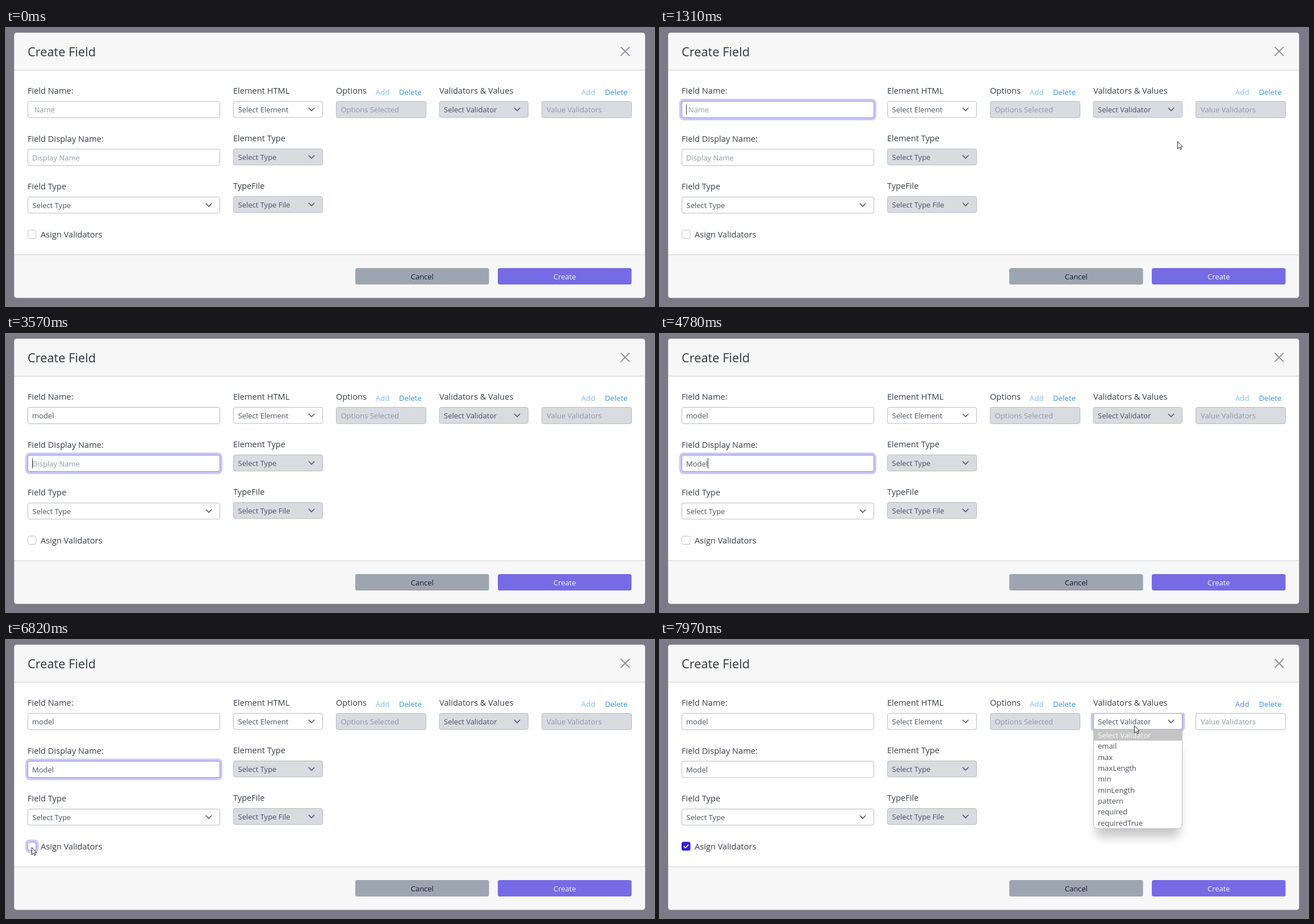
An HTML page that plays this animation: 1141 by 491 pixels, repeating every 8 s.

```html
<!DOCTYPE html>
<html lang="en">
<head>
<meta charset="utf-8">
<title>Create Field</title>
<style>
  html, body { margin: 0; width: 100%; height: 100%; overflow: hidden; background: #7b7a86; }
  svg { display: block; width: 100%; height: 100%; }
  text { font: 13px "Open Sans", "Noto Sans", sans-serif; fill: #4a5260; white-space: pre; }
  .title { font-size: 21.8px; fill: #2f3540; }
  .label { font-size: 14.6px; fill: #363d49; }
  .hint { fill: #8f97a4; }
  .link { font-size: 13.2px; fill: #3091f2; }
  .box { fill: #fff; stroke: #b5bbc5; }
  .off { fill: #d8dbe0; }
  .ring { fill: none; stroke: #321fdb; stroke-opacity: .25; stroke-width: 4; }
  .edge { fill: none; stroke: #998fed; }
  .mid { text-anchor: middle; }
</style>
</head>
<body>
<svg id="stage" viewBox="0 0 1141 491" xmlns="http://www.w3.org/2000/svg">
  <defs>
    <filter id="blur" x="-30%" y="-30%" width="160%" height="160%"><feGaussianBlur stdDeviation="9"/></filter>
    <clipPath id="below"><rect x="740" y="129" width="200" height="60"/></clipPath>
  </defs>
  <rect width="1141" height="491" fill="#7b7a86"/>
  <rect x="14" y="8" width="1111.5" height="469" rx="5" fill="#fff"/>
  <path d="M14 74.5V13a5 5 0 0 1 5-5H1120.5a5 5 0 0 1 5 5V74.5ZM14 400.5V472a5 5 0 0 0 5 5H1120.5a5 5 0 0 0 5-5V400.5Z" fill="#f7f7f7"/>
  <path d="M14 74.5H1125.5M14 400.5H1125.5" stroke="#d0d1d4"/>
  <rect x="14" y="8" width="1111.5" height="469" rx="5" fill="none" stroke="#6d6c77" stroke-opacity=".5"/>
  <path d="M1083 34 1097.5 48.5M1097.5 34 1083 48.5" stroke="#8a909a" stroke-width="1.8" stroke-linecap="round"/>
  <g id="form"></g>
  <g id="live"></g>
</svg>
<script>
const LOOP = 8000, BLINK = 530, STEP = 70;
const form = document.getElementById('form');
const live = document.getElementById('live');

function add(parent, tag, attrs, content) {
  const el = document.createElementNS('http://www.w3.org/2000/svg', tag);
  for (const key in attrs) el.setAttribute(key, attrs[key]);
  if (content) el.textContent = content;
  parent.appendChild(el);
  return el;
}
const text = (x, y, s, cls = '', parent = form) => add(parent, 'text', { x, y, class: cls }, s);
const box = (x, y, w, h, cls = 'box') => add(form, 'rect', { x, y, width: w, height: h, rx: 3.5, class: cls });
const show = (el, on) => el.setAttribute('visibility', on ? 'visible' : 'hidden');
const fade = (t, start) => Math.min(1, Math.max(0, (t - start) / 150));

function select(x, y, w, label, off) {
  const rect = box(x, y, w, 28.5, off ? 'box off' : 'box');
  text(x + 8, y + 19.5, label);
  const cx = x + w - 19.5, cy = y + 11.8;
  add(form, 'path', { d: `M${cx - 4.8} ${cy}l4.8 4.8 4.8-4.8`, fill: 'none', stroke: '#545b67',
    'stroke-width': 1.6, 'stroke-linecap': 'round', 'stroke-linejoin': 'round' });
  return rect;
}

// Focus outline: soft ring plus a tinted border
function focusMark(x, y, w, h, rx = 3.5) {
  const g = add(form, 'g', { opacity: 0 });
  add(g, 'rect', { x: x - 2.5, y: y - 2.5, width: w + 5, height: h + 5, rx: rx + 2.5, class: 'ring' });
  add(g, 'rect', { x, y, width: w, height: h, rx, class: 'edge' });
  return g;
}

function input(y, hintX, hint) {
  box(38.5, y, 338, 29);
  const mark = focusMark(38.5, y, 338, 29);
  return {
    mark,
    hint: text(hintX, y + 19.5, hint, 'hint'),
    value: text(46, y + 19.5, ''),
    caret: add(form, 'rect', { x: 46, y: y + 5.5, width: 1, height: 18, fill: '#2f3540' })
  };
}

text(38, 50, 'Create Field', 'title');
[[38, 116, 'Field Name:'], [38, 201, 'Field Display Name:'], [38, 285, 'Field Type'],
 [400, 116, 'Element HTML'], [400, 200, 'Element Type'], [400, 284, 'TypeFile'],
 [581, 116, 'Options'], [763, 116, 'Validators & Values'], [61, 370, 'Asign Validators']
].forEach(([x, y, s]) => text(x, y, s, 'label'));

text(651, 118, 'Add', 'link').style.fill = '#80baf7';
text(692, 118, 'Delete', 'link');
const addLink = text(1013, 118, 'Add', 'link');
text(1054.5, 118, 'Delete', 'link');

const name = input(129.5, 49.7, 'Name');
const display = input(214, 46, 'Display Name');
select(38.5, 298.5, 338, 'Select Type');
select(400.5, 129.5, 157, 'Select Element');
select(400.5, 213.5, 157, 'Select Type', true);
select(400.5, 297.5, 157, 'Select Type File', true);
box(581.5, 129.5, 158, 29, 'box off');
text(589.5, 149, 'Options Selected', 'hint');
const validator = select(763, 129.5, 156.5, 'Select Validator', true);
const valueBox = box(943.5, 129.5, 158, 29, 'box off');
text(952, 149, 'Value Validators', 'hint');

add(form, 'rect', { x: 615, y: 424, width: 235.5, height: 29, rx: 3.5, fill: '#9da5b1' });
add(form, 'rect', { x: 866, y: 424, width: 235.5, height: 29, rx: 3.5, fill: '#766be4' });
text(732.8, 444, 'Cancel', 'mid').style.fill = '#191a30';
text(983.8, 444, 'Create', 'mid').style.fill = '#f4f3fd';

add(form, 'rect', { x: 38.5, y: 357, width: 14.5, height: 14.5, rx: 3, fill: '#fff', stroke: '#bfc3ca' });
const checkMark = focusMark(38.5, 357, 14.5, 14.5, 3);
const check = add(form, 'g', {});
add(check, 'rect', { x: 38, y: 356.5, width: 15.5, height: 15.5, rx: 3.5, fill: '#321fdb' });
add(check, 'path', { d: 'M42.3 364.6l2.5 2.5 4.8-5', fill: 'none', stroke: '#fff', 'stroke-width': 1.9,
  'stroke-linecap': 'round', 'stroke-linejoin': 'round' });

const validatorMark = focusMark(763, 129.5, 156.5, 28.5);
validatorMark.setAttribute('clip-path', 'url(#below)');

const menu = add(live, 'g', {});
add(menu, 'rect', { x: 768, y: 190, width: 147, height: 158, rx: 6, fill: '#000', opacity: .22, filter: 'url(#blur)' });
add(menu, 'path', { d: 'M763.5 158.5H919.5V326a7 7 0 0 1-7 7H770.5a7 7 0 0 1-7-7Z', fill: '#fff', stroke: '#b9b9bd' });
add(menu, 'rect', { x: 763.5, y: 158.5, width: 156, height: 19.2, fill: '#c5c5c5' });
['Select Validator', 'email', 'max', 'maxLength', 'min', 'minLength', 'pattern', 'required', 'requiredTrue']
  .forEach((s, i) => {
    text(771, 172.8 + 19.35 * i, s, '', menu).style.fill = i ? '#4a4e58' : '#fafafa';
  });

const arrow = add(live, 'path', { d: 'M.5.5V13.3L3.4 10.6 5.3 14.8 7.3 13.9 5.5 9.9 9 9.5Z',
  fill: '#fff', stroke: '#24242c', 'stroke-width': 1, 'stroke-linejoin': 'round' });
const beam = add(live, 'path', { d: 'M-3-8H-1L0-7 1-8H3M0-7V7M-3 8H-1L0 7 1 8H3', fill: 'none', stroke: '#24242c' });

// Pointer trips: each ends at `end`, keys are [time, x, y]
const trips = [
  { end: 1030, keys: [[200, 869, 430], [340, 560, 340], [480, 330, 250], [620, 205, 187], [750, 178, 152]] },
  { end: 1590, keys: [[1030, 178, 152], [1100, 240, 152], [1170, 420, 163], [1310, 911, 200],
    [1380, 1020, 208], [1450, 1080, 212], [1520, 1111, 214]] },
  { end: 6990, keys: [[5770, 971, 457], [5910, 450, 455], [5980, 240, 446], [6050, 140, 425], [6120, 100, 405],
    [6260, 70, 384], [6400, 58, 376], [6540, 52, 373], [6680, 45, 366]] },
  { end: LOOP, keys: [[6990, 60, 360], [7060, 170, 330], [7270, 647, 216], [7340, 730, 190],
    [7410, 785, 172], [7480, 815, 160], [7550, 828, 154], [7690, 835, 151]] }
];

function pointerAt(t) {
  const trip = trips.find(({ end, keys }) => t >= keys[0][0] && t < end);
  if (!trip) return null;
  const { keys } = trip, start = keys[0][0];
  const s = start + Math.floor((t - start) / STEP) * STEP;
  const i = keys.findIndex(k => k[0] > s);
  if (i < 0) return keys[keys.length - 1].slice(1);
  const [t0, x0, y0] = keys[i - 1], [t1, x1, y1] = keys[i];
  const p = (s - t0) / (t1 - t0);
  return [x0 + (x1 - x0) * p, y0 + (y1 - y0) * p];
}

const fields = [
  { ui: name, word: 'model', strokes: [2520, 2650, 2780, 2980, 3110], focus: 900, caret: 1060, blur: 3430 },
  { ui: display, word: 'Model', strokes: [4160, 4330, 4450, 4590, 4780], focus: 3420, caret: 3430, blur: 6820 }
];

function drawField({ ui, word, strokes, focus, caret, blur }, t) {
  const typed = strokes.filter(s => s <= t);
  const last = typed.length ? typed[typed.length - 1] : caret;
  ui.value.textContent = word.slice(0, typed.length);
  show(ui.hint, !typed.length);
  ui.mark.setAttribute('opacity', fade(t, focus) - fade(t, blur));
  const on = t >= caret && t < blur && Math.floor((t - last) / BLINK) % 2 === 0;
  show(ui.caret, on);
  if (on) ui.caret.setAttribute('x', 46 + Math.round(typed.length ? ui.value.getComputedTextLength() : 0));
}

function draw(t) {
  fields.forEach(f => drawField(f, t));

  const checked = t >= 6890;
  show(check, checked);
  checkMark.setAttribute('opacity', t >= 6820 && t < 7690 ? 1 : 0);
  validator.setAttribute('class', checked ? 'box' : 'box off');
  valueBox.setAttribute('class', checked ? 'box' : 'box off');
  addLink.style.fill = checked ? '#4f86c8' : '#80baf7';
  validatorMark.setAttribute('opacity', fade(t, 7680));
  show(menu, t >= 7760);

  const p = pointerAt(t);
  const inText = p && p[0] > 38 && p[0] < 377 && p[1] > 129 && p[1] < 159;
  show(arrow, p && !inText);
  show(beam, inText);
  if (p) (inText ? beam : arrow).setAttribute('transform', `translate(${Math.round(p[0])} ${Math.round(p[1])})`);
}

const began = performance.now();
function tick() {
  draw((performance.now() - began) % LOOP);
  requestAnimationFrame(tick);
}
tick();
</script>
</body>
</html>
```
